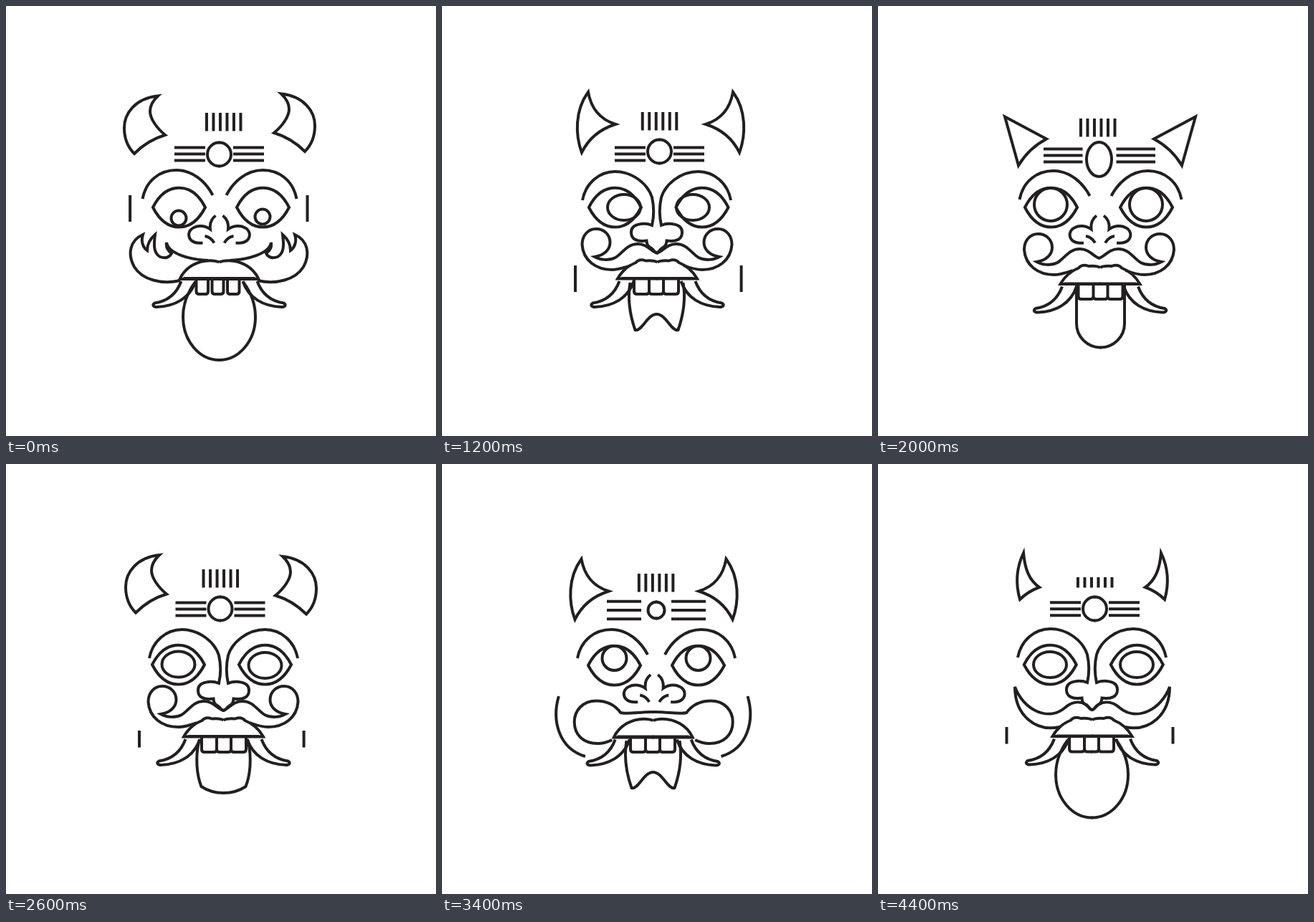
Animation of 600 by 600 pixels, one loop 4600 ms. Source, as an HTML page:

```html
<!DOCTYPE html>
<html lang="en">
<head>
<meta charset="utf-8">
<title>Mask faces</title>
<style>
  html, body { margin: 0; width: 100%; height: 100%; overflow: hidden; background: #fff; }
  svg { display: block; width: 100vw; height: 100vh; }
  path { fill: none; stroke: #231f20; stroke-width: 4; stroke-miterlimit: 4; }
  .face { display: none; }
  .face.on { display: inline; }
</style>
</head>
<body>
<svg id="stage" viewBox="0 0 600 600"></svg>
<script>
const STEP = 200;
const stage = document.getElementById('stage');

const ring = (rx, ry) => `M${-rx},0a${rx},${ry} 0 1 1 ${2 * rx},0a${rx},${ry} 0 1 1 ${-2 * rx},0Z`;
const halfRing = (rx, ry) => `M1,${-ry}h-1a${rx},${ry} 0 0 0 0,${2 * ry}h1`;
const rows = (from, to, gap) => [-gap, 0, gap].map(y => `M${from},${y}H${to}`).join('');
const posts = h => [-23.75, -14.25, -4.75].map(x => `M${x},0v${h}`).join('');
const slants = [-58, -48.5, -39, -29.5].map(x => `M${x},0l21,26`).join('') + 'M-20.5,0L0,25';
const tusk = 'M-50,380H1M-53,384C-60,403 -73,412 -90,414.5C-94,417 -92,420 -87,420C-62,419 -41,408 -33,384';

// Left halves, drawn around x = 0; the right half is the mirror image.
const shapes = {
  bull: 'M-86,125.5C-118,129 -133,150 -133,170C-133,186 -127,198 -119,206C-107,194 -93,185 -76,180C-88,170 -97,157 -97,147C-97,138 -93,132 -86,125.5Z',
  cat: 'M-133,135L-75,166C-92,175 -105,188 -114,203Z',
  devil: 'M-101,120C-97,143 -85,158 -63,165C-85,172 -101,186 -110,204.5C-119,180 -120,146 -101,120Z',
  small: 'M-96,124C-94,147 -88,162 -74,172C-85,176 -94,182 -101,189C-107,168 -106,145 -96,124Z',

  tall: posts(25.5),
  short: posts(14.5),
  slant: slants,
  lines: rows(-62.5, -19.5, 9),
  longLines: rows(-84.5, -26, 9),
  midLines: rows(-78, -23.5, 9),
  wideLines: rows(-69, -21, 12.3),
  disc: halfRing(16.5, 16.5),
  bigDisc: halfRing(17.5, 17.5),
  egg: halfRing(17.5, 24),
  dot: halfRing(11.5, 11.5),

  brow: 'M-98,269C-93,243 -73,229 -51,229C-28,229 -10,245 0,264',
  nose: 'M-5,292.5C-11,297 -13.5,303 -12.5,311.5C-20,306 -30,306 -35,309C-44,313 -44,322 -39,327C-35,331 -29,331 -23,330.5M-20,321C-14,322 -10,325.5 -7,330.5',
  arch: 'M-103.5,271C-99,247 -80,231 -58,231C-33,231 -12,249 -6.5,267C-3.5,280 -4,295 -6.5,306C-16,302 -36,303 -35.5,316C-35.5,325 -28,329.5 -14,327.5C-13.5,337 -8,336 -5,340C-3,343 -2,344 0,344h1',
  bigArch: 'M-117.5,276C-111,251 -91,236 -66,236C-39,236 -17,254 -9.5,270C-6,285 -7,298 -9.5,311C-18,307 -40,305 -39.5,320C-39.5,331 -32,334 -18.5,332.5C-17,345 -9,349 0,349h1',

  eye: 'M-36.5,281C-27,262 -15,253.7 0,253.7C15,253.7 27,262 36.5,281C27,299.5 14,308.5 0,308.5C-14,308.5 -27,299.5 -36.5,281Z',
  peep: ring(10.5, 10.5),
  iris: ring(17, 17),
  bigIris: ring(23, 23),
  wide: ring(23, 18),

  earL: 'M0,0v37',
  earS: 'M0,0v23.5',
  cheek: 'M-133,324C-143,358 -133,397 -96,408',

  flame: 'M-54,383C-80,389 -107,382 -118,364C-128,346 -124,327 -106,319C-109,328 -106,337 -100,341C-100,332 -96,325 -89,319C-91,334 -91,345 -82,350C-74,353 -68,350 -66,345C-72,341 -74,336 -73,330C-70,346 -40,354 -15,355',
  whisker: 'M-27,359C-50,357 -75,352 -102,347C-70,342.5 -25,334 0,348.5',
  curl: 'M.5,352C-8,350 -13,339 -27,339C-42,339 -48,352 -58,358C-68,363 -80,361 -87,357C-74,355 -65.5,347 -65.5,337C-65.5,326 -74,318 -85,318C-97,318 -104.5,328 -104.5,340C-103,362 -85,375 -63,375C-53,375 -45,372 -37,369',
  jowl: 'M1,346C-18,345 -34,350 -46,347C-54,336 -64,330.5 -80,330.5C-99,330.5 -110.5,344 -110.5,360C-110.5,378 -98,390 -78,390C-70,390 -64,388 -58,385',
  spike: 'M-46,367C-80,374 -108,350 -108,311C-96,343 -62,360 -38,340C-29,332 -18,330 -8,336C-5,339 -2,343 0,343',

  lip: 'M1,381H-55C-47,363.5 -29,355.2 -13,355.2C-7,355.2 -3,356 0,357.5' + tusk,
  bumpLip: 'M1,380.5H-55.5C-49,369 -40,362 -30,358C-26,353 -20,354 -16,355.5C-10,355 -4,355 0,357.5' + tusk,
  teeth: 'M-31,381v17q0,4 4,4h13q4,0 4,-4v-17M-10,381v17q0,4 4,4h7',
  gaps: 'M-30,381v17q0,4 4,4h9q3.5,0 3.5,-4v-17M-8,381v17q0,4 4,4h5',

  oval: 'M-34,386C-46,402 -50.5,417 -50.5,434C-50.5,468 -27,494 0,494h1',
  round: 'M-33.5,383V436A33.5,33.5 0 0 0 0,469.5h1',
  long: 'M-33.5,383V450.5A33.5,33.5 0 0 0 0,484h1',
  fork: 'M-37,386C-41,410 -37,432 -30,452C-21,455 -13,430 0,430h1',
  slab: 'M-34,386C-40,410 -37,435 -31,450C-22,456 -11,459 0,459h1'
};

// Each part: shape, centre x, y, spread from the centre, extra y on the right.
const faces = [
  `bull 298 0 0 -3, tall 303.7 149, lines 297.5 206.5, disc 297.5 207, brow 298 0 9.5, nose 297.5 0,
   eye 300 0 58.5, peep 299.5 296 58.5 -2, earL 296.8 264 123.7, flame 297 0, lip 297.5 0, gaps 295.5 0, oval 297.5 0`,
  `devil 304 8, short 306 158, longLines 309 209, bigDisc 309 209, brow 310.5 1 15, nose 310 0,
   eye 308 0 66.5, iris 307.5 281 66.5, earL 301.5 264 124.5, curl 308.5 -7, bumpLip 310 0, teeth 310.5 0, long 310.5 0`,
  `small 299 -1, tall 302 149, lines 300 204, disc 300 203, arch 299.5 0,
   eye 302 0 60.8, wide 302 281 60.8, earS 300 366 116, spike 300 0, bumpLip 300.5 0, teeth 299 0, fork 299.5 0`,
  `cat 304 0, slant 310.8 155, longLines 310.5 213.5, bigDisc 310.5 213.5, bigArch 308.5 0,
   eye 308 0 66.5, iris 307.5 281 66.5, earS 305.2 366 114.8, whisker 310.5 0, lip 310 0, teeth 310.5 0, round 310.5 0`,
  `cat 302 -20, tall 299 149, wideLines 299 204, dot 299 204, brow 299 1 11, nose 297 1,
   eye 299.5 0 58.5, iris 299.5 271 58.5, cheek 299 0, jowl 297 0, lip 297 0, teeth 296 0, fork 296.5 0`,
  `bull 296 0, tall 303 149, lines 298 206, disc 298 206, brow 298 0 9.5, nose 297.5 0,
   eye 300 0 58.5, peep 299.5 296 58.5, earL 296.8 264 123.7, flame 297 0, lip 297.5 0, gaps 295.5 0, oval 297.5 1`,
  `devil 305 0, tall 303.5 148, lines 303.5 206.5, disc 303.5 203, arch 299.5 0,
   eye 302.2 0 60.8, wide 302 281 48, earL 301.8 362 115.8, curl 300 -7, bumpLip 300.5 0, teeth 299 0, fork 299.5 0`,
  `small 299 13, short 301 158, lines 300.8 202.5, disc 300.8 202, arch 303.5 0,
   eye 301 -1 60.5, wide 301 280 60.5, earS 299.5 370 115.5, spike 303 0, bumpLip 303.5 0, teeth 304 0, slab 303.5 1`,
  `small 301 13, tall 306 153, longLines 309.5 212, bigDisc 309.5 212, bigArch 308.5 0,
   eye 308 0 66.5, iris 307.5 281 66.5, whisker 310.5 0, lip 310 0, teeth 310.5 0, round 310.5 0`,
  `bull 295 -1, tall 301 149, lines 298 206, disc 298 206, brow 298 0 9.5, nose 297.5 0,
   eye 300 0 58.5, peep 299.5 296 58.5, earL 296.8 264 123.7, flame 297 0, lip 297.5 0, gaps 295.5 0, oval 297.5 1`,
  `cat 310 19.5, tall 306.7 157, midLines 309 208.5, egg 308.5 214, brow 310.5 1 15, nose 310 0,
   eye 308 0 66.5, bigIris 307.5 277 66.5, curl 308.5 0, bumpLip 310 7.5, teeth 310.5 7, round 310.5 7`,
  `devil 304 21, slant 309 155, longLines 309.5 213.5, bigDisc 309.5 213.5, bigArch 308.5 0,
   eye 308 0 66.5, iris 307.5 281 66.5, earS 305.2 366 114.8, whisker 310.5 0, lip 310 0, teeth 310.5 0, round 310.5 0`,
  `bull 301 1, tall 303 149, longLines 309.5 208, bigDisc 309.5 208, bigArch 308.5 0,
   eye 308 0 66.5, bigIris 307.5 277 66.5, earS 304 368 115, whisker 310.5 0, lip 310 0, teeth 310.5 0, round 310.5 0`,
  `bull 300 1.5 0 2, tall 299.3 147, lines 299 202.5, disc 299 202, arch 303.5 0,
   eye 301 -1 60.5, wide 301 279.5 60.5 1.5, earS 300.8 372 114.8, curl 303 -8, bumpLip 303.5 0, teeth 304 0, slab 303.5 0`,
  `cat 299 0, tall 300 153, lines 298 206.5, disc 298 206.5, brow 298 0 9.5, nose 297.5 0,
   eye 300 0 58.5, peep 299.5 296 58.5, earL 296.8 264 123.7, flame 297 0, lip 297.5 0, gaps 295.5 0, oval 297.5 1`,
  `cat 304.5 2, short 302.5 158, lines 302.5 202.5, disc 302.5 202, arch 298.5 -1,
   eye 300.8 -1 60.5, wide 300.5 280 60.5, earS 295.5 367 116, spike 299 0, bumpLip 299 -.5, teeth 298 -.5, oval 298.5 0`,
  `small 300 12, tall 301 152, lines 300.5 203, disc 300.5 202, arch 303.5 0,
   eye 301 -1 60.5, wide 301 280 60.5, earS 300.8 372 114.8, curl 303 -8, bumpLip 303.5 0, teeth 304 0, slab 303.5 1`,
  `devil 295.5 12.5, tall 298.6 153, wideLines 299 204, dot 299 204, brow 299 2 12, nose 296.2 1.5,
   eye 299 0 58.5, iris 299 271 58.5, cheek 294.7 0 -1.2, jowl 295.2 0, lip 294.7 .5, teeth 294 0, fork 294.5 0`,
  `devil 314.5 12, tall 306.7 155, longLines 309.5 212, bigDisc 309.5 212, bigArch 308.5 0,
   eye 308 0 66.5, iris 307.5 281 66.5, earS 305.2 366 114.8, whisker 310.5 0, lip 310 0, teeth 310.5 0, round 310.5 0`,
  `small 299 0, short 302.7 158, lines 302.5 202.3, disc 302.5 202, arch 298.5 -1,
   eye 300.8 -1 60.5, wide 300.5 280 60.5, earS 295.5 367 116, spike 299 0, bumpLip 299 -.5, teeth 298 -.5, oval 298.5 -.5`
];

const order = [0, 1, 2, 3, 4, 5, 6, 7, 8, 9, 10, 11, 12, 13, 14, 15, 16, 17, 15, 16, 16, 18, 19];

function drawPart(text) {
  const [name, ...nums] = text.trim().split(/\s+/);
  const [x, y, spread = 0, skew = 0] = nums.map(Number);
  const half = (side, dy) =>
    `<path d="${shapes[name]}" transform="translate(${x - side * spread} ${y + dy}) scale(${side} 1)"/>`;
  return half(1, 0) + half(-1, skew);
}

stage.innerHTML = faces
  .map(face => `<g class="face">${face.split(',').map(drawPart).join('')}</g>`)
  .join('');

const groups = [...stage.children];
const start = performance.now();
let shown = null;

function tick(now) {
  const step = Math.floor(Math.max(0, now - start) / STEP) % order.length;
  const next = groups[order[step]];
  if (next !== shown) {
    if (shown) shown.classList.remove('on');
    next.classList.add('on');
    shown = next;
  }
  requestAnimationFrame(tick);
}
tick(start);
</script>
</body>
</html>
```
